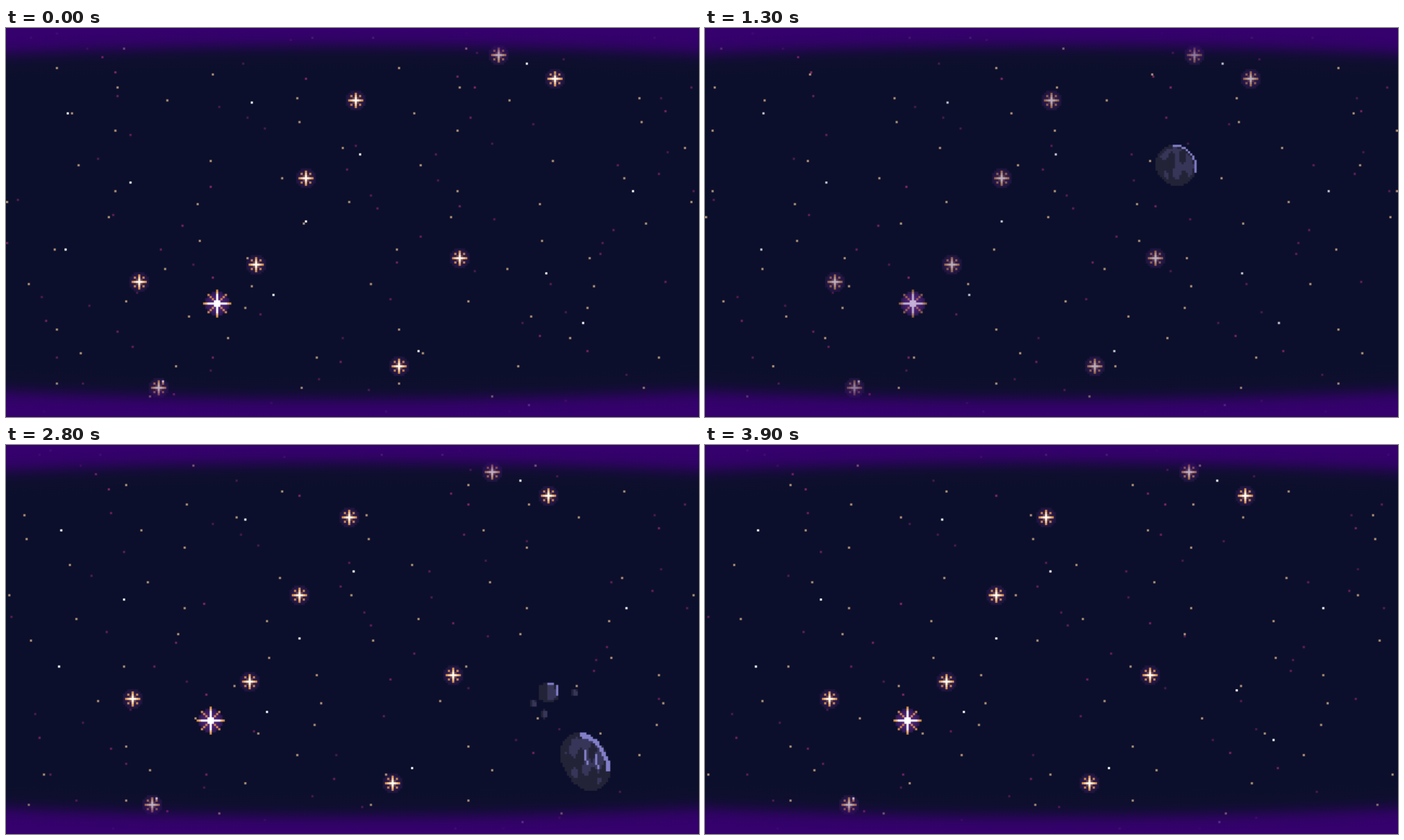
Write an HTML page with a canvas that moves like this. It is 998 by 561 pixels and loops after 4000 ms.

```html
<!DOCTYPE html>
<html lang="en">
<head>
<meta charset="utf-8">
<title>Pixel starfield</title>
<style>
html, body { margin: 0; width: 100%; height: 100%; overflow: hidden; background: #0c0f2b; }
canvas { display: block; }
</style>
</head>
<body>
<canvas id="stage" width="998" height="561"></canvas>
<script>
const W = 998, H = 561, LOOP = 4000, STEP = 100;
const COLS = 320, ROWS = 180, TILE = 158;
const ROCK = { base: '#232338', mid: '#373659', light: '#827ec8' };
const stage = document.getElementById('stage').getContext('2d');

// Scene grid with two device pixels per cell, so that half-cell drifts stay crisp
const grid = document.createElement('canvas');
grid.width = COLS * 2;
grid.height = ROWS * 2;
const ctx = grid.getContext('2d');
ctx.scale(2, 2);

function seeded(seed) {
  return () => {
    seed = (seed * 1664525 + 1013904223) % 4294967296;
    return seed / 4294967296;
  };
}

// Even spread: one dot per band of rows, golden-ratio steps across
function scatter(count, width, seed) {
  const random = seeded(seed);
  return Array.from({ length: count }, (_, i) => ({
    x: Math.floor((i * 0.618 + random() * 0.3) % 1 * width),
    y: Math.floor((i + random()) / count * ROWS),
    glow: random() ** 2
  }));
}

const nearDots = scatter(38, TILE, 7);
const whiteDots = scatter(15, COLS, 21);
const pinkDots = scatter(78, COLS, 40);
const stars = [[253, 23], [161, 33], [138, 69], [115, 109], [209, 106], [61, 117], [181, 156]];
const fadedStars = [[227, 12], [70, 166]];

function cell(x, y, color) {
  ctx.fillStyle = color;
  ctx.fillRect(x, y, 1, 1);
}

function disc(x, y, radius, rgb, strength) {
  const n = Math.ceil(radius);
  for (let dy = -n; dy <= n; dy++) {
    for (let dx = -n; dx <= n; dx++) {
      const d = Math.hypot(dx, dy) / radius;
      if (d <= 1) cell(x + dx, y + dy, `rgba(${rgb},${strength * (1.15 - 0.75 * d)})`);
    }
  }
}

function cross(x, y, d, color) {
  for (const s of [-d, d]) {
    cell(x + s, y, color);
    cell(x, y + s, color);
  }
}

function corners(x, y, d, color) {
  for (const sx of [-d, d]) for (const sy of [-d, d]) cell(x + sx, y + sy, color);
}

function smallStar(x, y, opacity) {
  disc(x, y, 4.8, '92,42,130', 0.5);
  ctx.globalAlpha = opacity;
  corners(x, y, 2, '#cc8b4c');
  corners(x, y, 1, '#6b4050');
  cross(x, y, 3, '#e0994f');
  cross(x, y, 2, '#f8cd8c');
  cross(x, y, 1, '#fff0d6');
  cell(x, y, '#ffffff');
  ctx.globalAlpha = 1;
}

function largeStar(x, y, opacity) {
  disc(x, y, 5.6, '118,44,170', 0.75);
  ctx.globalAlpha = opacity;
  for (const d of [2, 3, 4]) corners(x, y, d, '#cf8a4b');
  for (let d = 6; d > 0; d--) cross(x, y, d, d > 5 ? '#d9934d' : d > 4 ? '#f1bd7c' : '#ffffff');
  corners(x, y, 1, '#ffffff');
  cell(x, y, '#ffffff');
  ctx.globalAlpha = 1;
}

// Tilted pixel blob: lit rim on the upper right, wavy patches on the lit side
function rock(cx, cy, a, b, { tilt = 0, power = 2, rim = 2 } = {}) {
  const n = Math.ceil(Math.max(a, b)), c = Math.cos(tilt), s = Math.sin(tilt);
  for (let dy = -n; dy <= n; dy++) {
    for (let dx = -n; dx <= n; dx++) {
      const u = Math.abs(dx * c + dy * s) / a, v = Math.abs(dy * c - dx * s) / b;
      const r = (u ** power + v ** power) ** (1 / power);
      if (r > 1) continue;
      const angle = Math.atan2(dy, dx);
      const lit = r > rim && angle > -1.75 && angle < 0.42;
      const wave = Math.sin(dx * 1.1 + 1) + Math.sin(dy * 0.5 + dx * 0.3);
      const patch = r < 0.85 && wave + (dx - dy) / n > 0.1;
      cell(cx + dx, cy + dy, lit ? ROCK.light : patch ? ROCK.mid : ROCK.base);
    }
  }
}

function largeRock(x, y) {
  rock(x, y, 14, 10.2, { tilt: 1.05, power: 2.2, rim: 0.82 });
  ctx.fillStyle = ROCK.light;
  for (const dx of [0, 5]) {
    ctx.fillRect(x + dx, y - 5 + dx * 0.4, 1, 5);
    ctx.fillRect(x + dx + 1, y + dx * 0.4, 1, 2);
  }
}

function rubble(x, y) {
  rock(x + 8, y + 4, 4.6, 4.2, { power: 3.5, rim: 0.84 });
  for (const [dx, dy, size] of [[1, 9, 1.8], [6, 14, 1.9], [20, 4, 1.7], [23, 34, 2.2], [32, 31, 2.6]]) {
    rock(x + dx, y + dy, size * 1.15, size * 0.85, { tilt: 1.2 });
  }
}

// Elliptical purple haze along the top and bottom edges
function haze() {
  const inner = 215, outer = 281;
  const fade = stage.createRadialGradient(0, 0, inner, 0, 0, outer);
  for (let i = 0; i <= 12; i++) {
    const r = inner + (outer - inner) * i / 12;
    const alpha = 0.97 / (1 + Math.exp((255 - r) / 6));
    fade.addColorStop(i / 12, `rgba(55,0,112,${i && alpha})`);
  }
  stage.save();
  stage.translate(W / 2, H / 2);
  stage.scale(6.5, 1);
  stage.fillStyle = fade;
  stage.fillRect(-W / 2, -H / 2, W, H);
  stage.restore();
}

function draw(t) {
  const drift = Math.round(2.1 * t) / 2;
  const dip = Math.abs(t - 0.9) < 1 ? (1 + Math.cos(Math.PI * (t - 0.9))) / 2 : 0;
  const level = 1 - 0.55 * dip;

  ctx.fillStyle = '#0c0f2b';
  ctx.fillRect(0, 0, COLS, ROWS);
  for (const { x, y, glow } of pinkDots) {
    cell(x - drift, y, `rgb(${70 + 65 * glow},${27 + 13 * glow},${77 + 31 * glow})`);
  }
  ctx.globalAlpha = 0.4 + 0.6 * level;
  for (const { x, y } of whiteDots) cell(x - drift, y, '#ffffff');
  ctx.globalAlpha = 1;
  for (const [x, y] of stars) smallStar(x - drift, y, level);
  for (const [x, y] of fadedStars) smallStar(x - drift, y, level * 0.75);
  largeStar(97 - drift, 127, level);

  const scroll = Math.round(TILE * t) % TILE;
  for (let left = -scroll; left < COLS; left += TILE) {
    for (const { x, y } of nearDots) cell(left + x, y, '#b0927a');
  }

  const pass = t % 2.59 - 0.7;
  rubble(Math.round(52 - 388 * pass), 110);
  largeRock(Math.round(39 - 466 * pass), 146);
  rock(Math.round(217 - 392 * (t - 1.3)), 63, 9.8, 9.1, { tilt: 0.8, rim: 0.9 });

  stage.drawImage(grid, 0, 0, W, H);
  haze();
}

const start = performance.now();
function tick() {
  const elapsed = (performance.now() - start) % LOOP;
  draw(Math.floor(elapsed / STEP) * STEP / 1000);
  requestAnimationFrame(tick);
}
tick();
</script>
</body>
</html>
```
